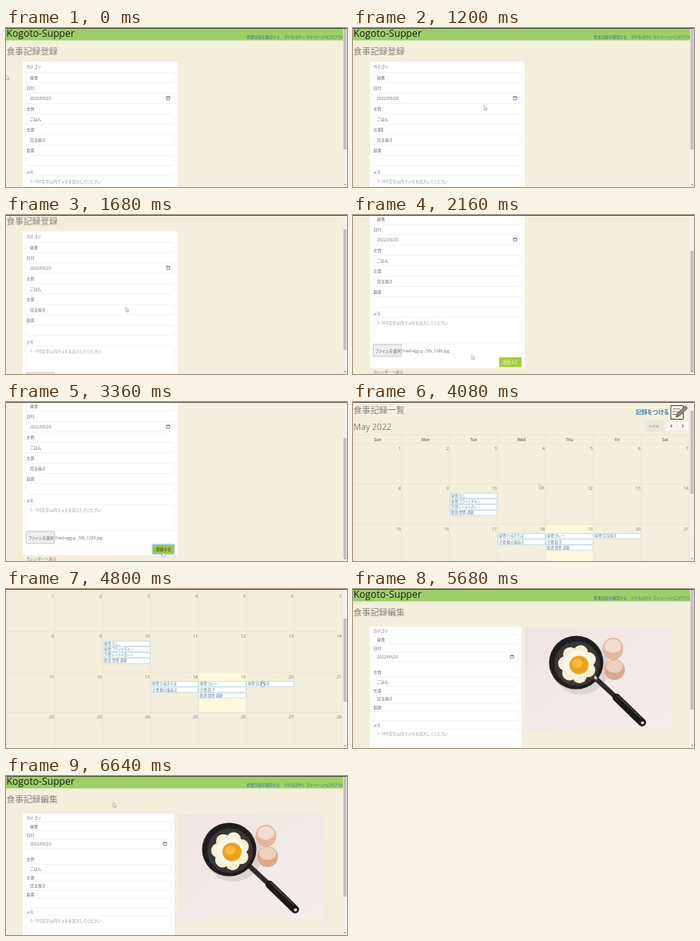
An HTML page for the animation above (6720 ms loop, 427 by 199 pixels).

```html
<!DOCTYPE html>
<html lang="ja">
<head>
<meta charset="utf-8">
<title>食事記録</title>
<style>
html, body { margin: 0; width: 100%; height: 100%; overflow: hidden; background: #f4eedc; }
svg { display: block; width: 427px; height: 199px; }
text { font: 5px "Open Sans", "Noto Sans CJK JP", "Noto Sans CJK", sans-serif; font-feature-settings: "palt"; fill: #6b6b6b; white-space: pre; }
.brand { font-size: 12.2px; font-weight: 500; fill: #171c14; }
.title { font-size: 10.7px; fill: #85827b; font-weight: 500; }
.nav { fill: #437b8c; letter-spacing: -.22px; }
.hint { fill: #959595; }
.field { fill: #fff; stroke: #ececec; stroke-width: .6; }
.month { font-size: 10.6px; fill: #85827b; font-weight: 500; }
.day { font-size: 5.2px; fill: #77736a; }
.head { font-size: 5px; font-weight: 600; fill: #6a665e; }
.event { font-size: 4.4px; fill: #64809a; }
.link { fill: #7a8794; }
.add { font-size: 7.2px; font-weight: 700; fill: #3f7db0; }

svg * { animation-duration: 6.72s; animation-iteration-count: infinite; animation-timing-function: linear; }
.scene, .flag { visibility: hidden; animation-timing-function: step-end; }
#form { animation-name: form; }
#cal { animation-name: cal; }
#edit { animation-name: edit; }
#form .page { animation-name: formScroll; }
#form .thumb { animation-name: formThumb; }
#cal .page { animation-name: calScroll; }
#cal .thumb { animation-name: calThumb; }
#cursor { animation-name: move; animation-timing-function: ease-in-out; }
#hand { animation-name: hand; }
#arrow { animation-name: arrow; }
#caret { animation-name: caret; }
#focus { animation-name: focus; }

@keyframes form { 0% { visibility: visible } 52.38%, 100% { visibility: hidden } }
@keyframes cal { 0% { visibility: hidden } 52.38% { visibility: visible } 80.95%, 100% { visibility: hidden } }
@keyframes edit { 0% { visibility: hidden } 80.95%, 100% { visibility: visible } }
@keyframes formScroll { 0%, 23.2% { transform: none } 28%, 100% { transform: translateY(-57px) } }
@keyframes formThumb { 0%, 23.2% { transform: none } 28%, 100% { transform: translateY(44px) } }
@keyframes calScroll {
  0%, 54.76% { transform: none }
  57.14%, 61.3% { transform: translateY(-19px) }
  63.7%, 100% { transform: translateY(-68px) }
}
@keyframes calThumb {
  0%, 54.76% { transform: none }
  57.14%, 61.3% { transform: translateY(10px) }
  63.7%, 100% { transform: translateY(36px) }
}
@keyframes move {
  0% { transform: translate(0, 59px) }
  7.44%, 11.9% { transform: translate(45px, 135px) }
  17.1%, 18.6% { transform: translate(164px, 97px) }
  23.8% { transform: translate(150px, 112px) }
  31.25%, 35.7% { transform: translate(148.5px, 175px) }
  44.64%, 52.38% { transform: translate(196px, 187px) }
  59.5%, 63.1% { transform: translate(233px, 102.5px) }
  70.2%, 80.95% { transform: translate(320px, 115.5px) }
  97.6%, 100% { transform: translate(134.5px, 33.5px) }
}
@keyframes hand {
  0% { visibility: hidden } 44% { visibility: visible } 52.38% { visibility: hidden }
  69% { visibility: visible } 80.95%, 100% { visibility: hidden }
}
@keyframes arrow {
  0% { visibility: visible } 44% { visibility: hidden } 52.38% { visibility: visible }
  69% { visibility: hidden } 80.95%, 100% { visibility: visible }
}
@keyframes caret { 0% { visibility: hidden } 11.9% { visibility: visible } 23.2%, 100% { visibility: hidden } }
@keyframes focus { 0% { visibility: hidden } 46.4% { visibility: visible } 52.38%, 100% { visibility: hidden } }
</style>
</head>
<body>
<svg id="stage" viewBox="0 0 427 199"></svg>
<script>
const rect = (x, y, w, h, fill, more = "") =>
  `<rect x="${x}" y="${y}" width="${w}" height="${h}" fill="${fill}" ${more}/>`;
const oval = (x, y, rx, ry, fill, more = "") =>
  `<ellipse cx="${x}" cy="${y}" rx="${rx}" ry="${ry}" fill="${fill}" ${more}/>`;
// y is the vertical middle of the line
const text = (x, y, s, cls = "", size = 5, more = "") =>
  `<text x="${x}" y="${y + size * .36}" class="${cls}" ${more}>${s}</text>`;
const path = (d, more) => `<path d="${d}" ${more}/>`;
const box = (x, y, w, h) => rect(x, y, w, h, "#fff", 'rx="1.2" class="field"');

const navBar = () => rect(0, 0, 427, 15.5, "#9dcf68") +
  text(.5, 6.4, "Kogoto-Supper", "brand", 12.2) +
  [[301, "食事記録を確認する"], [348, "グチをぼやく"], [375.5, "マイページへ"], [402, "ログアウト"]]
    .map(([x, s]) => text(x, 11, s, "nav")).join("");

const scene = (id, page, thumb) => `<g id="${id}" class="scene">
  ${rect(0, 0, 427, 199, "#f4eedc")}<g class="page">${page}</g>
  ${rect(422, 0, 5, 199, "#f1f1f0")}
  ${rect(422.6, 1, 3.8, thumb, "#bfbfbf", 'class="thumb"')}
  ${path("M423.3 195.5h2.6l-1.3 1.6z", 'fill="#666"')}</g>`;

const dateIcon = (x, y) =>
  path(`M${x} ${y - 1.8}h4v3.8h-4zm0 .7h4`, 'fill="none" stroke="#444" stroke-width=".6"');

const labels = ["カテゴリ", "日付", "主食", "主菜", "副菜"];
const values = ["昼食", "2022/05/20", "ごはん", "目玉焼き", ""];
const memoHint = "1~100文字以内でメモを記入してください";

function fields(labelY, fieldY, width, height) {
  return labels.map((label, i) =>
    text(25.5, labelY[i], label) +
    box(25, fieldY[i] - height / 2, width, height) +
    text(30, fieldY[i], values[i])).join("") +
    dateIcon(width + 15, fieldY[1] - .3);
}

const formPage = navBar() + text(.5, 29, "食事記録登録", "title", 10.7) +
  rect(21, 42, 194, 206.5, "#fff", 'rx="1"') +
  fields([48.5, 75, 101, 127, 153], [62, 88, 114, 140, 166], 186, 13) +
  rect(36.3, 124.5, .7, 5.5, "#444", 'id="caret" class="flag"') +
  text(25.5, 180, "メモ") + box(25, 185, 186, 33) + text(30, 192, memoHint, "hint") +
  rect(25.3, 219, 35.4, 15, "#efefef", 'stroke="#a5a5a5" stroke-width=".6" rx=".6"') +
  text(28, 227, "ファイルを選択") + text(62, 227, "fried-egg-g...5fb_1280.jpg") +
  rect(183, 235, 28, 12.5, "#a4cf3f", 'rx="1"') +
  text(197, 241.5, "登録する", "", 5, 'text-anchor="middle" style="fill:#f6f7cf"') +
  `<g id="focus" class="flag">${rect(183.3, 235.3, 27.4, 12, "#9ac63c", 'rx="1.2" stroke="#9fd0dc" stroke-width="1.4"')}
  ${text(197, 241.5, "登録する", "", 5, 'text-anchor="middle" style="fill:#34412a"')}</g>` +
  text(25.5, 253, "カレンダーへ戻る", "link");

const colX = i => 1 + 60 * i;
const rowY = i => 71 + 50.5 * i;
const events = [
  [2, 1, "昼食:なし", "昼食:フライドチキン", "夕食:レトルトカレー", "飲酒 間食 運動"],
  [3, 2, "昼食:たぬきそば", "夕食:鯖の塩焼き"],
  [4, 2, "昼食:カレー", "夕食:餃子", "飲酒 間食 運動"],
  [5, 2, "昼食:目玉焼き"]
];

function calendarPage() {
  let out = navBar() + text(.5, 29, "食事記録一覧", "title", 10.7) +
    text(.5, 49.7, "May 2022", "month", 10.6) +
    text(354, 31.2, "記録をつける", "add", 7.2) +
    path("M398 23.5h15.5v17h-15.5z", 'fill="#f8f5e9" stroke="#444" stroke-width="1"') +
    path("M400.5 27.5h9m-9 3.5h7m-7 3.5h5", 'stroke="#666" stroke-width=".8"') +
    path("M404.5 38l1.4-4.6 10.2-9.6 2.7 2.8-10 9.8z", 'fill="#8a8781" stroke="#333" stroke-width=".8"') +
    rect(366, 43, 22, 12, "#ece7d9", 'rx="1.2" stroke="#e0dbcd" stroke-width=".5"') +
    text(377, 49, "today", "", 5.2, 'text-anchor="middle" style="fill:#a5a197"') +
    rect(391, 43, 29.5, 12, "#f9f7f1", 'rx="1.2" stroke="#e0dcd0" stroke-width=".5"') +
    path("M405.8 43v12", 'stroke="#e0dcd0" stroke-width=".5"') +
    path("M399.4 47.2l-1.8 1.8 1.8 1.8m12.6-3.6l1.8 1.8-1.8 1.8", 'fill="none" stroke="#333" stroke-width="1"') +
    rect(colX(4), rowY(2), 60, 50.5, "#fcf8dc");
  let grid = "M1 60H421";
  for (let r = 0; r < 7; r++) grid += `M1 ${rowY(r)}H421`;
  for (let c = 0; c < 8; c++) grid += `M${colX(c)} 60V374`;
  out += path(grid, 'fill="none" stroke="#e5dfce" stroke-width=".6"');
  ["Sun", "Mon", "Tue", "Wed", "Thu", "Fri", "Sat"].forEach((d, i) => {
    out += text(colX(i) + 30, 65.7, d, "head", 5, 'text-anchor="middle"');
  });
  for (let n = 0; n < 42; n++) {
    const more = `text-anchor="end"${n > 30 ? ' opacity=".4"' : ""}`;
    out += text(colX(n % 7) + 59, rowY(n / 7 | 0) + 5.8, n % 31 + 1, "day", 5.2, more);
  }
  for (const [c, r, ...lines] of events) lines.forEach((s, i) => {
    const y = rowY(r) + 11.7 + i * 7.15;
    out += rect(colX(c) + .6, y, 58.8, 6.4, "#fff", 'stroke="#a9cfe2" stroke-width=".6" rx=".6"') +
      text(colX(c) + 1.8, y + 3.2, s, "event", 4.4);
  });
  return out;
}

function photo() {
  let petals = "";
  for (let i = 0; i < 7; i++) {
    const a = i * Math.PI * 2 / 7 - .4;
    petals += oval(281 + 15 * Math.cos(a), 94 + 15 * Math.sin(a), 9.2, 9.2, "#f6f0d6");
  }
  return rect(215, 48, 183, 131.5, "url(#table)") +
    oval(285, 98, 36, 34, "#cfc6c3", 'opacity=".6"') +
    path("M304 112L332 138", 'stroke="#2b2a2a" stroke-width="6"') +
    path("M330 136L362 167", 'stroke="#1b1a1a" stroke-width="10" stroke-linecap="round"') +
    path("M332 134L360 161", 'stroke="#4a4848" stroke-width="1.5" stroke-linecap="round"') +
    oval(362.5, 167.5, 2, 2, "#d9d2d0") +
    oval(279.5, 92, 34, 33.5, "#1f1e1e") +
    oval(280.5, 93.5, 28.5, 28, "#393634") + petals +
    oval(281, 94, 17, 17, "#fbf8ea") +
    oval(283, 95, 12, 11.5, "#f0a01c") +
    oval(281, 93, 6.5, 5.5, "#f7bb42") +
    oval(325.5, 75, 13, 14, "#e3b8a0") +
    oval(325.5, 71.5, 10.5, 8.5, "#f3ddd0") +
    oval(327.5, 101, 13, 13, "#dda98d") +
    oval(327.5, 97, 10.5, 8, "#efd0bf");
}

const editPage = navBar() + text(.5, 29, "食事記録編集", "title", 10.7) +
  rect(21, 47, 190, 170, "#fff", 'rx="1"') +
  fields([52, 74, 104, 127, 148], [63, 85, 116, 137.5, 159], 182, 11.5) +
  text(25.5, 170, "メモ") + box(25, 175, 182, 33) + text(30, 181, memoHint, "hint") + photo();

document.getElementById("stage").innerHTML = `
  <defs><linearGradient id="table" x2="1" y2="1">
    <stop stop-color="#eee5e3"/><stop offset="1" stop-color="#f5eeeb"/></linearGradient></defs>` +
  scene("form", formPage, 151) + scene("cal", calendarPage(), 104) + scene("edit", editPage, 150) +
  rect(0, 0, 427, .9, "#3b3d38") +
  `<g id="cursor">` +
  path("M0 0v5.6l1.4-1.2 1 2 .9-.4-.9-2h1.8z", 'id="arrow" class="flag" fill="#fff" stroke="#777" stroke-width=".5"') +
  path("M0 0q.7-.7 1.2 0v2.3l2.3.6v2l-.8 1.5h-2.7l-1.8-2.3q.3-.9 1.8.3z", 'id="hand" class="flag" fill="#fff" stroke="#666" stroke-width=".5"') +
  `</g>`;
</script>
</body>
</html>
```
